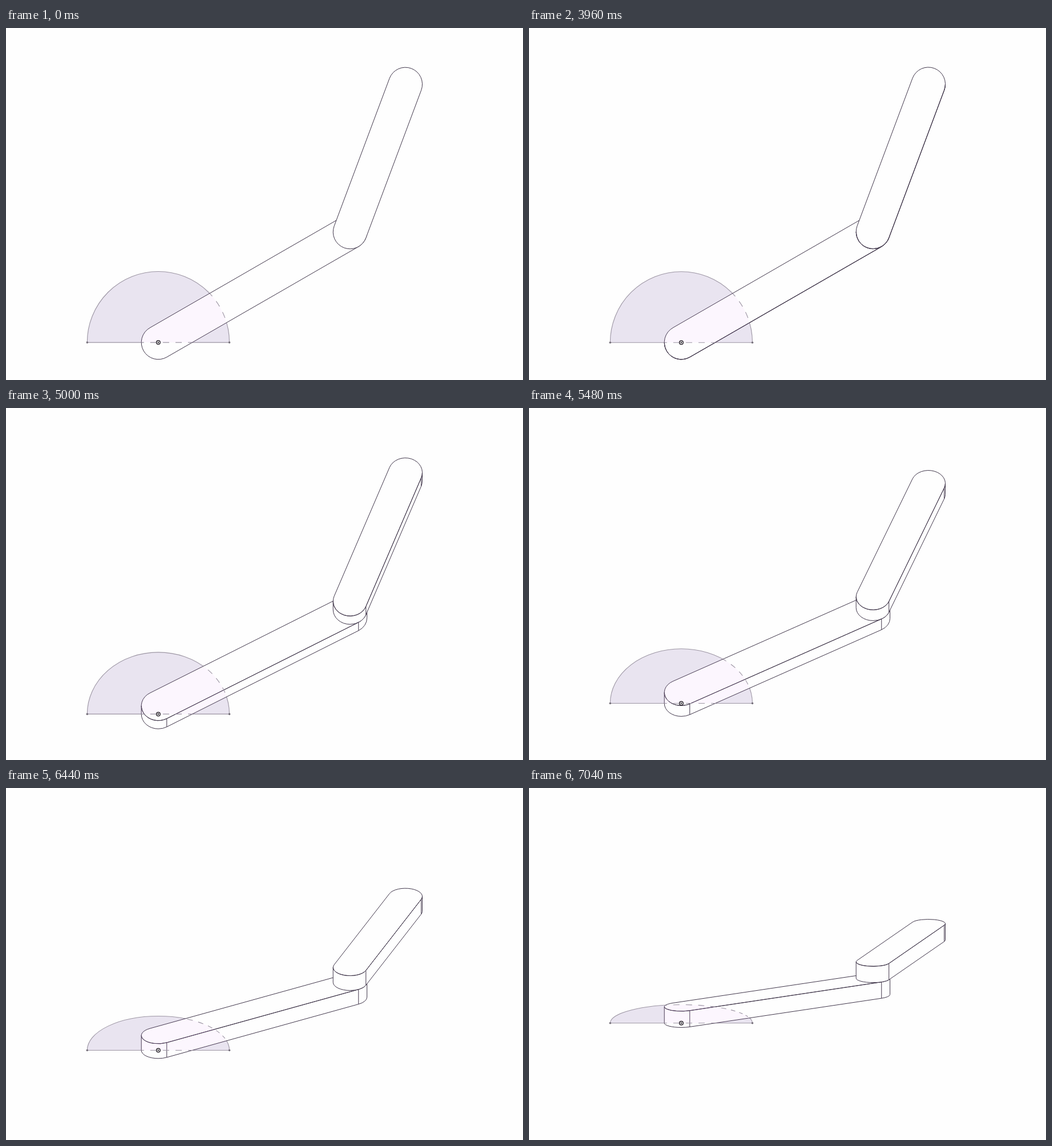
Recreate the animation shown at these times as an HTML page with a canvas. Size 906 by 618 pixels, loop 8000 ms.

```html
<!DOCTYPE html>
<html lang="en">
<head>
<meta charset="utf-8">
<title>Tilting linkage</title>
<style>
html, body { margin: 0; width: 100%; height: 100%; overflow: hidden; background: #fefefe; }
canvas { display: block; }
</style>
</head>
<body>
<canvas id="stage" width="906" height="618"></canvas>
<script>
const ctx = document.getElementById('stage').getContext('2d');
const LOOP = 8000, FRAME = 40;
const STARTS = [3928, 4718, 5287, 5845, 6384], TURN = 320, STEP = 15;
const MID = 325.5;          // screen y of the rotation axis
const H = 29.6, R = 29.7;   // arm thickness and end radius
const DASH = 11.05;
const PAPER = '#fefefe', INK = '#40364a', GREY = '#9c95a3';
const rad = deg => deg * Math.PI / 180;

// Coordinates: x on screen, y relative to the axis, z height above the middle plane
const makeArm = (x, y, length, deg, z) => ({
  x, y, z, side: rad(90 - deg),
  x2: x + length * Math.cos(rad(deg)),
  y2: y - length * Math.sin(rad(deg))
});
const lower = makeArm(266.9, 226.6, 388, 30, -H);
const upper = makeArm(lower.x2, lower.y2, 276.8, 69.5, 0);
const sketch = { x: 266.9, y: 226.6, r: 124.6 };

let cos, sin;

function tilt(t) {
  let angle = 0;
  for (const start of STARTS) {
    const p = Math.min(1, Math.max(0, (t - start) / TURN));
    angle += STEP * p * p * (3 - 2 * p);
  }
  return rad(angle);
}

const screenY = (y, z) => MID + y * cos - z * sin;

// Runs path calls on a plane at height z, leaving the pen unscaled
function onPlane(z, trace) {
  ctx.setTransform(1, 0, 0, cos, 0, MID - z * sin);
  trace();
  ctx.setTransform(1, 0, 0, 1, 0, 0);
}

function topPath(a) {
  onPlane(a.z + H, () => {
    ctx.moveTo(a.x + R * Math.cos(a.side), a.y + R * Math.sin(a.side));
    ctx.arc(a.x, a.y, R, a.side, a.side + Math.PI);
    ctx.arc(a.x2, a.y2, R, a.side + Math.PI, a.side + 2 * Math.PI);
    ctx.closePath();
  });
}

function wallPath(a) {
  onPlane(a.z, () => {
    ctx.moveTo(a.x - R, a.y);
    ctx.arc(a.x, a.y, R, Math.PI, a.side, true);
    ctx.arc(a.x2, a.y2, R, a.side, 0, true);
  });
  onPlane(a.z + H, () => {
    ctx.arc(a.x2, a.y2, R, 0, a.side);
    ctx.arc(a.x, a.y, R, a.side, Math.PI);
    ctx.closePath();
  });
}

function solidPath(a) {
  ctx.beginPath();
  topPath(a);
  if (sin > 0) wallPath(a);
}

function drawArm(a) {
  solidPath(a);
  ctx.fillStyle = PAPER;
  ctx.fill();
  if (sin > 0) {
    for (const [x, y] of [[a.x, a.y], [a.x2, a.y2]]) {
      const ex = x + R * Math.cos(a.side), ey = y + R * Math.sin(a.side);
      ctx.moveTo(ex, screenY(ey, a.z));
      ctx.lineTo(ex, screenY(ey, a.z + H));
    }
  }
  ctx.strokeStyle = INK;
  ctx.lineWidth = 1;
  ctx.stroke();
}

// Dashes lie in the sketch plane, so those on the arc shorten as it tilts
function drawSketch(fill, dashed) {
  const { x, y, r } = sketch;
  const dash = dashed ? DASH / r : Math.PI;
  ctx.fillStyle = fill;
  ctx.beginPath();
  onPlane(-H, () => ctx.arc(x, y, r, 0, -Math.PI, true));
  ctx.fill();

  ctx.strokeStyle = GREY;
  ctx.lineWidth = 1.1;
  ctx.beginPath();
  onPlane(-H, () => {
    for (let a = 0; a < Math.PI; a += 2 * dash) {
      ctx.moveTo(x + r * Math.cos(a), y - r * Math.sin(a));
      ctx.arc(x, y, r, -a, -Math.min(a + dash, Math.PI), true);
    }
    const size = dash * r;
    for (let d = 0; d < 2 * r; d += 2 * size) {
      ctx.moveTo(x - r + d, y);
      ctx.lineTo(x - r + Math.min(d + size, 2 * r), y);
    }
  });
  ctx.stroke();
}

function dot(x, y, r, color) {
  ctx.fillStyle = color;
  ctx.beginPath();
  ctx.arc(x, y, r, 0, 2 * Math.PI);
  ctx.fill();
}

function draw(t) {
  const angle = tilt(t);
  cos = Math.cos(angle);
  sin = Math.sin(angle);
  ctx.fillStyle = PAPER;
  ctx.fillRect(0, 0, 906, 618);

  drawSketch('#e9e4f0', false);
  drawArm(lower);

  // The part of the sketch hidden by the arm shows through it
  ctx.save();
  solidPath(lower);
  ctx.clip();
  drawSketch('rgba(224,150,255,.08)', true);
  ctx.restore();

  drawArm(upper);

  const y = screenY(sketch.y, -H);
  dot(sketch.x - sketch.r, y, 1.8, '#77717c');
  dot(sketch.x + sketch.r, y, 1.8, '#77717c');
  dot(sketch.x, y, 4, '#2e2931');
  dot(sketch.x, y, 2.5, '#fff');
  dot(sketch.x, y, 1.3, '#2e2931');
}

const begin = performance.now();
function tick() {
  const t = (performance.now() - begin) % LOOP;
  draw(Math.floor(t / FRAME) * FRAME);
  requestAnimationFrame(tick);
}
tick();
</script>
</body>
</html>
```
